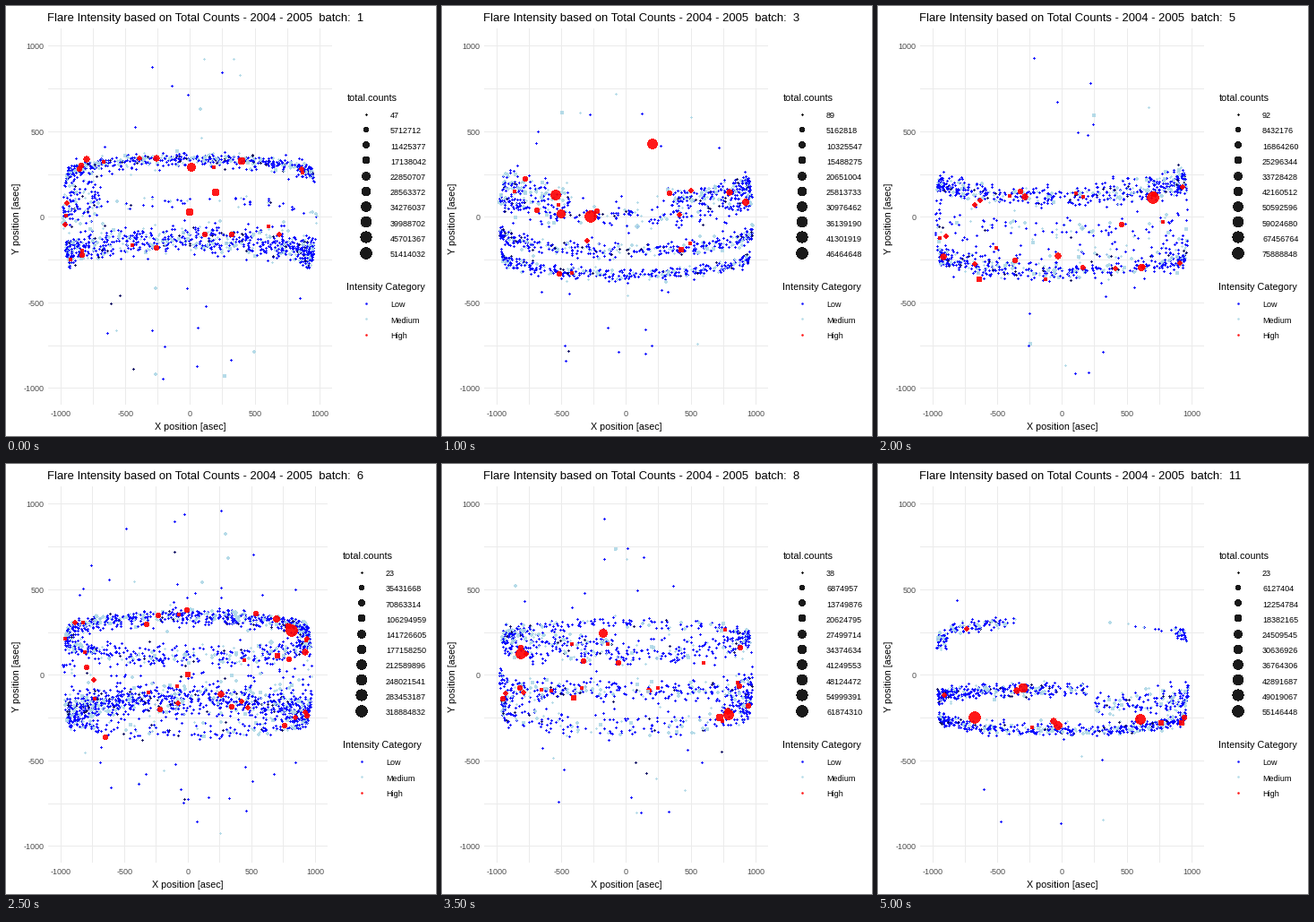
Animation, 480 px wide and 480 px high, one loop 5500 ms. Source, as a matplotlib script:

```python
import numpy as np
import matplotlib.pyplot as plt
from matplotlib.animation import FuncAnimation

plt.rcParams["font.family"] = "Liberation Sans"
PT = 0.72                      # points per pixel at 100 dpi
SUN = 985                      # disc radius in arcsec
LOW, MED, HIGH, DARK = range(4)
COLORS = np.array(["#0000ff", "#add8e6", "#ff0000", "#000058"])

fig = plt.figure(figsize=(4.8, 4.8), dpi=100, facecolor="white")
ax = fig.add_axes([0, 0, 1, 1])
batches = {}


def style(rng, n, share):
    """Radius and category for n small points, a share of them medium."""
    c = np.where(rng.random(n) < share, MED, LOW)
    c[(c == LOW) & (rng.random(n) < 0.06)] = DARK
    big = (c == MED) & (rng.random(n) < 0.4)
    r = np.where(big, 1.8 + rng.exponential(0.25, n), 1.25)
    return np.minimum(r, 2.8), c


def belt(rng, n, lat, tilt, spread, west=-85, east=85, share=0.25):
    """Flares along one solar latitude, projected onto the tilted disc."""
    streaks = rng.normal(lat, 0.8 * spread, max(4, n // 20))
    phi = np.radians(rng.choice(streaks, n) + rng.normal(0, 0.5 * spread, n))
    lon = np.radians(rng.uniform(west, east, n))
    b = np.radians(tilt)
    x = SUN * np.cos(phi) * np.sin(lon)
    y = SUN * (np.sin(phi) * np.cos(b) - np.cos(phi) * np.cos(lon) * np.sin(b))
    return np.column_stack([x, y, *style(rng, n, share)])


def strays(rng, n):
    """Lone events far from the belts, around the middle of the disc."""
    x = np.clip(rng.normal(0, 380, n), -850, 850)
    reach = np.sqrt(1000 ** 2 - x ** 2)
    y = rng.choice([-1, 1], n) * rng.uniform(380, np.maximum(reach, 480))
    return np.column_stack([x, y, *style(rng, n, 0.25)])


def batch(num, lo, hi, lone, strong, belts, peaks):
    """peaks are the few largest flares; other strong ones sit in the belts."""
    rng = np.random.default_rng(num)
    rows = np.vstack([belt(rng, *b) for b in belts])
    rng.shuffle(rows)
    reds = rows[:strong].copy()
    reds[:, 2] = np.minimum(2.4 + rng.exponential(0.5, strong), 3.8)
    reds[:, 3] = HIGH
    top = [(*p, HIGH) for p in peaks]
    batches[num] = lo, hi, np.vstack([rows, strays(rng, lone), reds, top])


def blend(num, lo, hi, a, b):
    """Batches overlap: keep the peaks and far strays of a, thin out the rest."""
    rng = np.random.default_rng(num)
    a, b = batches[a][2], batches[b][2]
    keep = (a[:, 3] == HIGH) | (a[:, 1] < -740) | (rng.random(len(a)) < 0.6)
    b = b[(b[:, 2] < 3.2) & (b[:, 1] > -740) & (rng.random(len(b)) < 0.4)]
    batches[num] = lo, hi, np.vstack([b, a[keep]])


batch(1, 47, 51414032, lone=28, strong=21,
      belts=[(620, 14, -6, 1.4), (850, -14, -6, 2.6), (80, 1, -6, 1.5),
             (130, 3, -6, 6, -85, -45)],
      peaks=[(17, 290, 5), (204, 139, 4.3), (0, 24, 4.6), (398, 327, 4.4)])

batch(3, 89, 46464648, lone=24, strong=14,
      belts=[(330, 8, 7, 2.2), (130, 13, 7, 2.5, -80, -25, 0.5),
             (200, 12, 7, 2, 20, 85), (420, -13, 7, 1.3), (400, -4, 7, 2)],
      peaks=[(211, 424, 5.8), (-543, 128, 6), (-273, 0, 7), (-500, 18, 5),
             (930, 86, 4)])

batch(5, 92, 75888848, lone=17, strong=22,
      belts=[(500, 13, 6, 2), (60, 17, 6, 1.5, 10, 80), (420, -13, 6, 1.8),
             (110, -8, 6, 3), (110, 0, 5, 4)],
      peaks=[(709, 110, 7), (-31, -228, 3.8), (619, -296, 4), (-640, -369, 3.5)])

batch(6, 23, 318884832, lone=46, strong=30,
      belts=[(640, 14, -6, 1.5), (420, 12, 6, 1.8), (1000, -14, -6, 3),
             (220, -13, 6, 1.5), (130, 0, 0, 7)],
      peaks=[(817, 257, 7), (697, 327, 4.2), (704, 110, 3.6), (0, 0, 3.6),
             (-640, -369, 3)])

batch(7, 69, 318884832, lone=34, strong=16,
      belts=[(500, 12.5, -6, 1.3), (520, -10, -6, 2), (40, 1, -6, 2, -40, 20)],
      peaks=[(817, 257, 7), (697, 327, 4.2), (0, 0, 3.6)])

batch(9, 43, 82189624, lone=27, strong=17,
      belts=[(560, 13, 6, 2.5), (110, 17, 6, 1.5, -75, -5, 0.4), (330, -1, 6, 2),
             (340, -12, 6, 2), (100, -8, 6, 3, 50, 85)],
      peaks=[(-176, 241, 5), (-813, 123, 6), (799, -238, 5.8), (730, -249, 4.4)])

batch(11, 23, 55146448, lone=7, strong=8,
      belts=[(90, 13, -5, 1.3, -65, -22), (50, 10, -5, 2, -85, -65),
             (30, 12, -5, 1.2, 66, 85), (20, 13, -5, 1), (340, -8, -3, 1.2, -80, 12),
             (520, -14, 5, 1.4), (170, -7, 3, 2.5, 15, 85)],
      peaks=[(-668, -249, 7), (-301, -81, 5.5), (612, -264, 5.8), (-31, -296, 4.8)])

blend(2, 61, 48905127, 1, 3)
blend(4, 89, 46464648, 3, 5)
blend(8, 38, 61874310, 9, 7)
blend(10, 31, 82189624, 9, 11)


def dots(x, y, r, colors):
    """Hard-edged discs; every touched pixel is filled, so the path is smaller."""
    r = np.asarray(r)
    half = np.where(r < 1.5, 0.5, 0)
    ax.scatter(np.floor(x) + half, np.floor(y) + half, s=(2 * PT * (r - 0.6)) ** 2,
               c=colors, alpha=0.9, linewidths=0, antialiased=False, zorder=2)


def text(x, y, s, size, color="black", **kw):
    ax.text(x, y, s, fontsize=size * PT, color=color, **kw)


def grid(right, mid, scale):
    line = dict(color="#ebebeb", lw=PT, snap=False, solid_capstyle="butt", zorder=1)
    for v in range(-1000, 1001, 250):
        x = int(mid + scale * v + 0.3) + 0.5
        y = int(235.8 - 0.191 * v) + 0.5
        ax.plot([x, x], [25, 445], **line)
        ax.plot([47, right], [y, y], **line)
        if v % 500 == 0:
            text(x, 458.5, str(v), 9, "#4d4d4d", ha="center")
            text(42.5, y + 3.5, str(v), 9, "#4d4d4d", ha="right")
    text(mid, 473, "X position [asec]", 10.8, ha="center")
    text(12, 237, "Y position [asec]", 10.8, rotation=90, ha="center", va="center")


def legend(x, lo, hi):
    k = np.arange(10)
    y = 121.2 + 17.2 * k
    text(x - 0.5, 106, "total.counts", 10.7)
    dots(np.full(10, x + 21), y, 1.25 + 5.75 * np.sqrt(k / 9), "black")
    for row, count in zip(y, np.linspace(lo, hi, 10)):
        text(x + 48, row + 4, str(round(count)), 9)
    text(x - 0.5, 317, "Intensity Category", 10.7)
    for j, name in enumerate(["Low", "Medium", "High"]):
        row = 332.5 + 17.3 * j
        dots([x + 21], [row], [1.9], COLORS[j])
        text(x + 48, row + 4, name, 9)


def draw(i):
    ax.cla()
    ax.set(xlim=(0, 480), ylim=(480, 0))
    ax.axis("off")
    lo, hi, pts = batches[i + 1]
    # nine-digit labels widen the legend and squeeze the panel
    right = 359 if hi >= 1e8 else 364
    mid, scale = (47 + right) / 2, (right - 47) / 2194
    text(46.5, 17, f"Flare Intensity based on Total Counts - 2004 - 2005  batch:  {i + 1}", 13)
    grid(right, mid, scale)
    x, y, r, c = pts.T
    dots(mid + scale * x, 235.5 - 0.191 * y, r, COLORS[c.astype(int)])
    legend(right + 17, lo, hi)


anim = FuncAnimation(fig, draw, frames=11, init_func=lambda: None,
                     interval=500, repeat=True, repeat_delay=0)
plt.show()
```
